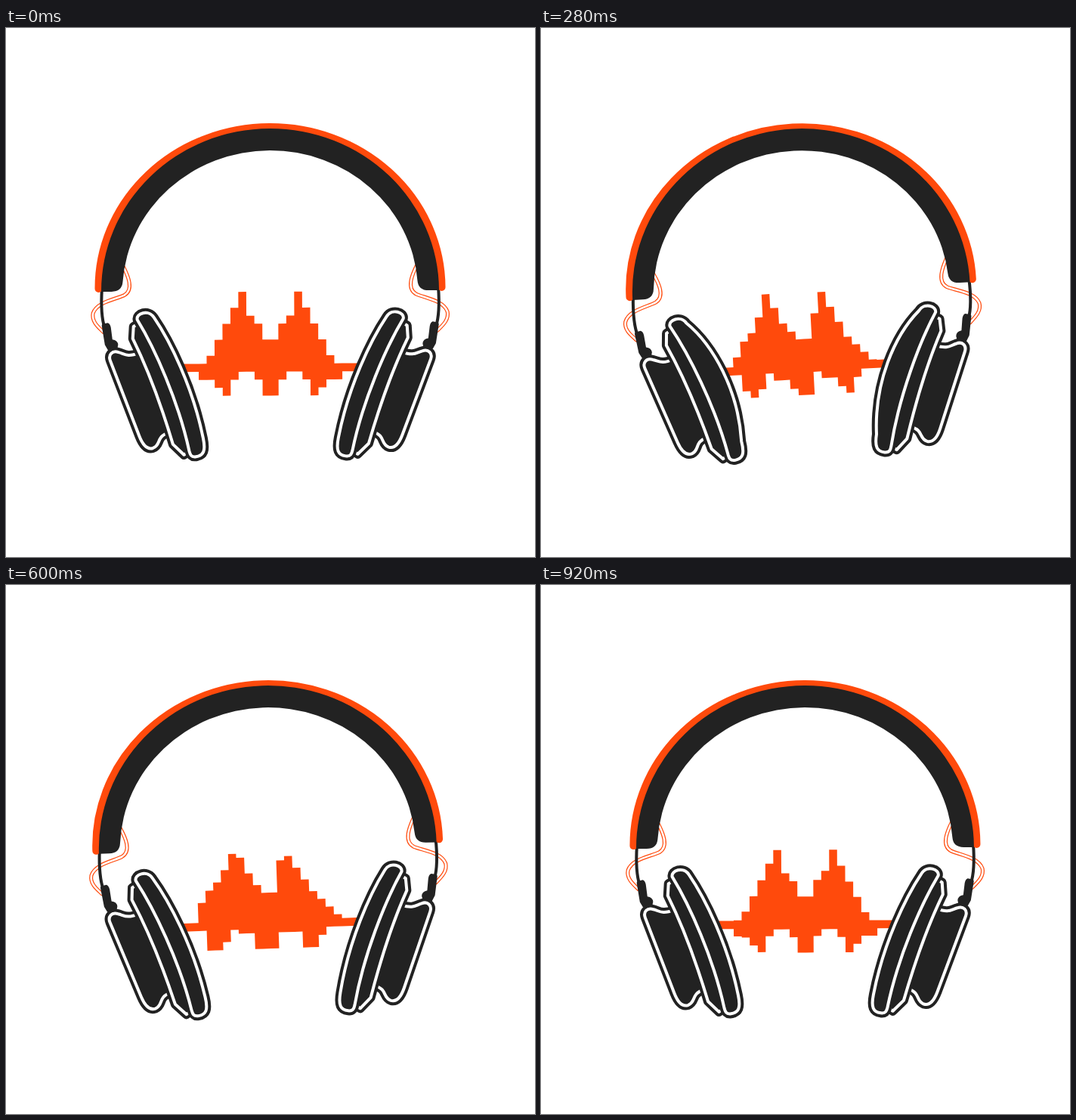
Recreate the animation shown at these times as an HTML page. Size 700x700 px, loop 0.96 s.

```html
<!DOCTYPE html>
<html lang="en">
<head>
<meta charset="utf-8">
<title>Headphones</title>
<style>
  html, body { margin: 0; width: 100%; height: 100%; overflow: hidden; background: #fff; }
  svg { display: block; width: 100vw; height: 100vh; }
  .dark { fill: #222; }
  .rim { fill: #222; stroke: #222; stroke-width: 12; stroke-linejoin: round; }
  .seam { fill: #222; stroke: #fff; stroke-width: 4; stroke-linejoin: round; }
  .line { fill: none; stroke-linecap: round; }
  .orange { stroke: #ff4a0c; }
</style>
</head>
<body>
<svg viewBox="0 0 700 700">
  <defs>
    <path id="cable" d="M156 316C162 328 170 346 157 353.500C145 359 121 362 115.500 377C113 388 123 396 129 402"/>
  </defs>
  <g id="head">
    <path id="wave" fill="#ff4a0c"/>
    <g id="ear">
      <g transform="translate(0 -.7)">
        <g class="line">
          <use href="#cable" class="orange" stroke-width="5"/>
          <use href="#cable" stroke="#fff" stroke-width="2.600"/>
          <path stroke="#222" stroke-width="4" d="M127.500 344C125.500 372 128 388 131 397"/>
        </g>
        <path class="dark" d="M127 394Q127 391 130 391L135 390Q138 391 139 396L141 412Q148 413 148.500 419L147 426H135L131 419Z"/>
        <g id="cup"></g>
      </g>
    </g>
    <use href="#ear" transform="translate(700 0) scale(-1 1)"/>
    <path class="line orange" stroke-width="10" d="M123 344A227 213 0 0 1 577 344"/>
    <path class="dark" d="M126.500 348A223.500 215 0 0 1 573.500 348H560Q546 348 545 335A195.500 186.300 0 0 0 155 335Q154 348 140 348Z"/>
  </g>
</svg>
<script>
const LOOP = 960, STEP = 40, BEAT = 240;
const COLS = 18, CELL = 10.56, LEFT = 255, TOP = 444, BASE = 454.7;
const $ = id => document.getElementById(id);
const ease = p => p * p * (3 - 2 * p);
const mix = (a, b, p) => a + (b - a) * p;

// A peak sits at a column and falls off to each side at its own rate.
const peak = (at, left, right) => ({ at, left, right });

function stairs(height, peaks, floor = 0) {
  const first = peaks[0].at, last = peaks[peaks.length - 1].at;
  return Array.from({ length: COLS }, (_, i) => {
    const heights = peaks.map(({ at, left, right }) =>
      height - (i < at ? left : right) * Math.floor(Math.abs(i - at)) ** .8);
    const low = i > first && i < last ? floor : 0;
    return Math.round(Math.max(low, ...heights));
  });
}

const calm = {
  up: stairs(9, [peak(5, 2.48, 2.55), peak(12, 2.55, 2.48)], 3),
  down: stairs(3, [peak(3, 1, 2), peak(8.5, 2, 2), peak(14, 2, 1)])
};
const mid = {
  up: stairs(9, [peak(4, 2.65, 2.1), peak(11, 3.4, 2.3)], 3),
  down: stairs(3, [peak(2, 1.45, 1.45), peak(8.5, 1, 9), peak(14, 1, 1.6)])
};
const full = {
  up: stairs(9, [peak(5, 1.4, 2.1), peak(10, 9, 1.78)], 4),
  down: stairs(3, [peak(1, 9, 1.3), peak(7, 9, .85), peak(13, 9, 1.3)])
};
const poses = [calm, mid, full, mid, calm];

function wavePath(t) {
  const k = Math.floor(t / BEAT), p = ease(t / BEAT - k);
  const blend = (side, i) => CELL * mix(poses[k][side][i], poses[k + 1][side][i], p);
  const col = i => LEFT + CELL * i;
  let d = `M228 ${TOP}`;
  for (let i = 0; i < COLS; i++) d += `H${col(i)}V${TOP - blend("up", i)}`;
  d += `H${col(COLS)}V${TOP}H472V${BASE}`;
  for (let i = COLS - 1; i >= 0; i--) d += `H${col(i + 1)}V${BASE + blend("down", i)}`;
  return d + `H${LEFT}V${BASE}H228Z`;
}

function padPath(bulge) {
  return `M174 386C172 377.500 189 372 196 383C${217 + bulge} 414 ${247 + bulge} 475 260.500 543` +
    "C264 560 261 566 251 567.500C244 568.500 243 564 242 560C228 494 197 424 174 386Z";
}

function part(d) {
  return ["rim", "seam"].map(name => {
    const path = document.createElementNS("http://www.w3.org/2000/svg", "path");
    path.setAttribute("class", name);
    path.setAttribute("d", d);
    $("cup").append(path);
    return path;
  });
}

// Housing, plate and pad, each partly covered by the next.
part("M176 430C160 436 157 431 149 429C141 426 135 432 138 440L176 540C181 553 187 558 194 556C205 552 198 541 214 536Z");
part("M176 391L169 395L168 411Q196 468 220.500 551L235 565L248 556L222 470Z");
const pad = part(padPath(0));

function draw(now) {
  const t = Math.floor(now % LOOP / STEP) * STEP;
  const sway = t < 320 ? ease(t / 320) : 1 - ease((t - 320) / 640);
  const squash = t < 2 * BEAT ? ease(1 - Math.abs(t / BEAT - 1)) : 0;
  $("head").setAttribute("transform", `rotate(${-.25 - 2.9 * sway} 350 455)`);
  $("wave").setAttribute("d", wavePath(t));
  pad.forEach(path => path.setAttribute("d", padPath(14 * squash)));
}

const start = performance.now();
function tick() {
  draw(performance.now() - start);
  requestAnimationFrame(tick);
}
tick();
</script>
</body>
</html>
```
